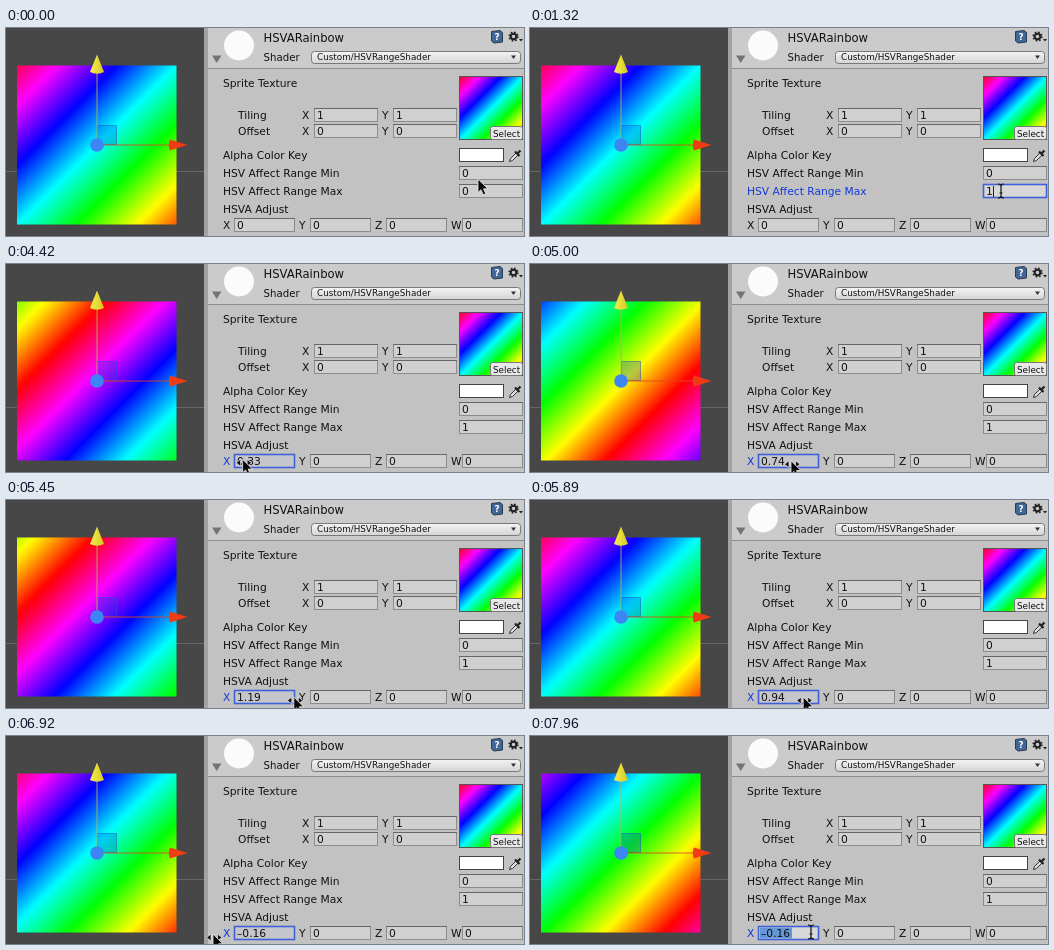
An HTML page that plays this animation: 518x208 px, repeating every 8000 ms.

```html
<!DOCTYPE html>
<html lang="en">
<head>
<meta charset="utf-8">
<title>Hue range inspector</title>
<style>
  html, body { margin: 0; width: 100%; height: 100%; overflow: hidden; background: #474747; }
  svg { display: block; width: 518px; height: 208px; }
  text { font: 10.7px "DejaVu Sans", sans-serif; fill: #111; white-space: pre; }
  .title { font-size: 11.6px; }
  .shader { font-size: 10.2px; }
  .small { font-size: 8.8px; }
  .active { fill: #1238d8; }
  .box { fill: #d0d0d0; stroke: #8c8c8c; }
  .edge { stroke: #666; }
  .focus .box { fill: #d8d8d8; stroke: #4060d8; stroke-width: 1.6; }
  .focus.pressed .box { fill: #c5c5cc; }
  .focus .edge { display: none; }
  .mark { fill: #6597d8; }
</style>
</head>
<body>
<svg viewBox="0 0 518 208">
  <defs>
    <linearGradient id="hues" gradientUnits="userSpaceOnUse" x1="11" y1="37.5" x2="170.5" y2="196.5"></linearGradient>
    <linearGradient id="thumbHues" x1="0" y1="0" x2="1" y2="1"></linearGradient>
    <linearGradient id="menu" x2="0" y2="1"><stop stop-color="#f4f4f4"/><stop offset="1" stop-color="#d4d4d4"/></linearGradient>
    <linearGradient id="cone"><stop stop-color="#f5ee55"/><stop offset="1" stop-color="#d5c91f"/></linearGradient>
  </defs>

  <rect width="518" height="208" fill="#474747"/>
  <path d="M0 143.5H198" stroke="#666"/>
  <rect x="11" y="37.5" width="159.5" height="159" fill="url(#hues)"/>

  <g id="gizmo">
    <rect x="91.5" y="97.5" width="19" height="19" fill="#0040e0" fill-opacity=".28" stroke="#2050d0" stroke-opacity=".5"/>
    <path d="M91 117V45" stroke="#b9b44a" stroke-opacity=".85"/>
    <path d="M91 117H164" stroke="#e0481c" stroke-opacity=".85"/>
    <path d="M91 26.5L98 44Q91 47.5 84 44Z" fill="url(#cone)"/>
    <path d="M181.500 117L164 122.500Q161.500 117 164 111.500Z" fill="#f03c14"/>
    <circle cx="91" cy="117" r="6.800" fill="#3c86f4"/>
  </g>

  <g id="panel">
    <rect x="198" width="320" height="208" fill="#a2a2a2"/>
    <rect x="202" width="316" height="208" fill="#c2c2c2"/>
    <rect x="202" width="316" height="40" fill="#cbcbcb"/>
    <path d="M202 40.5H518" stroke="#8e8e8e"/>
    <circle cx="233" cy="17.5" r="15" fill="#fbfbfb"/>
    <path d="M206 27.5H215.5L210.7 35Z" fill="#747474"/>
    <text class="title" x="257.5" y="14">HSVARainbow</text>
    <text class="shader" x="257.5" y="32.5">Shader</text>
    <rect x="305.5" y="23.5" width="209" height="12" rx="3" fill="url(#menu)" stroke="#787878"/>
    <text class="small" x="311" y="32.3">Custom/HSVRangeShader</text>
    <path d="M505 27.5H510L507.5 31Z" fill="#333"/>
    <path d="M485.5 3.5L494 2.500L496.500 4.500V14L488 15L485.500 13Z" fill="#426796" stroke="#283a55"/>
    <text class="small" x="488.5" y="12" style="fill:#fff;font-weight:bold">?</text>
    <circle cx="507.5" cy="8.5" r="2.8" fill="none" stroke="#222" stroke-width="2"/>
    <circle cx="507.5" cy="8.5" r="4.3" fill="none" stroke="#222" stroke-width="1.6" stroke-dasharray="1.7 1.677"/>
    <path d="M513 11H517L515 13.5Z" fill="#222"/>

    <text x="217" y="59">Sprite Texture</text>
    <text x="232" y="91">Tiling</text>
    <text x="232" y="107">Offset</text>
    <text x="217" y="131">Alpha Color Key</text>
    <text x="217" y="149">HSV Affect Range Min</text>
    <text x="217" y="167" id="maxLabel">HSV Affect Range Max</text>
    <text x="217" y="185">HSVA Adjust</text>

    <rect x="453.5" y="48.5" width="63" height="63" fill="url(#thumbHues)" stroke="#555"/>
    <rect x="484.5" y="98.5" width="32" height="13" rx="2" fill="#e8e8e8" stroke="#777"/>
    <text class="small" x="487" y="108.5">Select</text>

    <rect x="453.5" y="120.5" width="44" height="13" fill="#fff" stroke="#444"/>
    <path d="M503.5 133.500L504.500 130.500L510 125L512 127L506.500 132.500Z" fill="#ddd" stroke="#222" stroke-width=".9"/>
    <path d="M509 123.5L513.5 128M511.5 125.500L514.500 122.500" stroke="#222" stroke-width="2.2"/>
    <g id="fields"></g>
  </g>

  <g id="pointer">
    <g id="scrub" fill="#111" stroke="#eee" stroke-width=".7">
      <path d="M-6.500 3.500L-2 0V7Z"/><path d="M9 3.500L4.500 0V7Z"/>
    </g>
    <path id="arrow" d="M0 0V13.500L3 10.700L5.200 15.800L7.700 14.700L5.500 9.800H9.800Z" fill="#080808" stroke="#eee" stroke-width=".8"/>
    <path id="beam" d="M-3 -7Q0 -7 0 -5Q0 -7 3 -7M0 -5V5M-3 7Q0 7 0 5Q0 7 3 7M-1.500 2H1.500" fill="none" stroke="#111" stroke-width="1.2"/>
  </g>
</svg>

<script>
const LOOP = 8000, TICK = 147.4, LEAD = 14;
const SCRUB_ORIGIN = 217, VALUE_PER_PIXEL = 0.0168;
const SCENE_LAG = 0.6; // the scene repaints slightly behind the inspector
const $ = id => document.getElementById(id);

function make(tag, attrs, parent) {
  const node = document.createElementNS("http://www.w3.org/2000/svg", tag);
  for (const key in attrs) node.setAttribute(key, attrs[key]);
  return parent.appendChild(node);
}

function addField(x, y, width, value, label, labelX) {
  const group = make("g", {}, $("fields"));
  make("rect", { class: "box", x: x + .5, y: y + .5, width, height: 13 }, group);
  make("path", { class: "edge", d: `M${x} ${y + .5}h${width + 1}` }, group);
  const mark = make("rect", { class: "mark", x: x + 2, y: y + 1.5, width: 8, height: 11 }, group);
  const text = make("text", { x: x + 3, y: y + 11 }, group);
  const caret = make("path", { d: `M${x + 10.5} ${y + 2}v11`, stroke: "#222" }, group);
  text.textContent = value;
  mark.style.display = caret.style.display = "none";
  let name;
  if (label) {
    name = make("text", { x: labelX, y: y + 11 }, group);
    name.textContent = label;
  }
  return { group, mark, text, caret, name };
}

for (const [y, value] of [[80, 1], [96, 0]]) {
  addField(308, y, 63, value, "X", 296);
  addField(387, y, 63, value, "Y", 376);
}
addField(453, 138, 63, 0);
const maxField = addField(453, 156, 63, 0);
const [xField] = ["X", "Y", "Z", "W"].map((name, i) =>
  addField(228 + 76 * i, 190, 60, 0, name, 217 + 76 * i));

function fillStops(gradient, count) {
  return Array.from({ length: count + 1 }, (_, i) => make("stop", { offset: i / count }, gradient));
}
function paintHues(stops, first, last, shift) {
  stops.forEach((stop, i) => {
    const hue = first + (last - first) * i / (stops.length - 1) + shift;
    stop.setAttribute("stop-color", `hsl(${((hue % 1 + 1) % 1 * 360).toFixed(1)} 100% 50%)`);
  });
}
const hueStops = fillStops($("hues"), 60);
paintHues(fillStops($("thumbHues"), 36), .98, .03, 0);

// Keys are [tick, ...values], joined by straight lines.
function sample(keys, tick) {
  const next = keys.findIndex(key => key[0] > tick);
  if (next < 0) return keys[keys.length - 1].slice(1);
  const a = keys[next - 1], b = keys[next];
  const k = (tick - a[0]) / (b[0] - a[0]);
  return a.slice(1).map((v, i) => v + (b[i + 1] - v) * k);
}

const hueKeys = [[0, 0], [26, 0], [29, .28], [30, .33], [34, .74], [35, 1.1], [36, 1.32],
  [37, 1.19], [42, .78], [43, .74], [47, -.16]];
const approachKeys = [[0, 472, 151], [1, 472, 160], [2, 471, 166], [5, 471, 163], [11, 471, 163],
  [12, 400, 180], [13, 310, 188], [14, 263, 190], [15, 263, 190], [16, 258, 191], [17, 250, 193],
  [18, 250, 193], [19, 246, 194], [25, 217, 194]];
const leaveKeys = [[47, 207, 198], [48, 222, 198], [49, 233, 197], [50, 233, 197],
  [51, 245, 197], [52, 255, 196], [54, 281, 196]];

function pointerAt(tick, value) {
  if (tick < 26) return sample(approachKeys, tick);
  if (tick >= 47) return sample(leaveKeys, tick);
  return [SCRUB_ORIGIN + value / VALUE_PER_PIXEL, Math.min(197, 194 + (tick - 26) / 3)];
}

function show(node, visible) { node.style.display = visible ? "" : "none"; }

function draw(tick) {
  const [value] = sample(hueKeys, tick);
  const [sceneValue] = sample(hueKeys, Math.max(0, tick - SCENE_LAG));
  const [x, y] = pointerAt(tick, value);
  const editingMax = tick >= 4 && tick < 12, editingX = tick >= 12;
  const dragging = tick >= 26 && tick < 48;
  const scrubbing = dragging || tick > 17 && x < 228;
  const typing = !scrubbing && (tick >= 2 && tick < 12 || tick >= 14);

  paintHues(hueStops, .945, .055, sceneValue);

  $("maxLabel").classList.toggle("active", editingMax);
  maxField.group.classList.toggle("focus", editingMax);
  maxField.text.textContent = tick >= 9 ? "1" : "0";
  show(maxField.mark, editingMax && tick < 9);
  show(maxField.caret, editingMax && tick >= 9);

  xField.group.classList.toggle("focus", editingX);
  xField.group.classList.toggle("pressed", dragging);
  xField.name.classList.toggle("active", editingX);
  xField.text.textContent = value ? value.toFixed(2).replace("-", "\u2013") : "0";
  show(xField.mark, editingX && tick < 22 || tick >= 52);
  xField.mark.setAttribute("width", tick >= 52 ? 32 : 8);

  $("pointer").setAttribute("transform", `translate(${x.toFixed(1)} ${y.toFixed(1)})`);
  show($("scrub"), scrubbing);
  show($("arrow"), !typing);
  show($("beam"), typing);
}

let drawn = -1;
function frame() {
  const tick = Math.floor((performance.now() % LOOP + LEAD) / TICK);
  if (tick !== drawn) draw(drawn = tick);
  requestAnimationFrame(frame);
}
frame();
</script>
</body>
</html>
```
